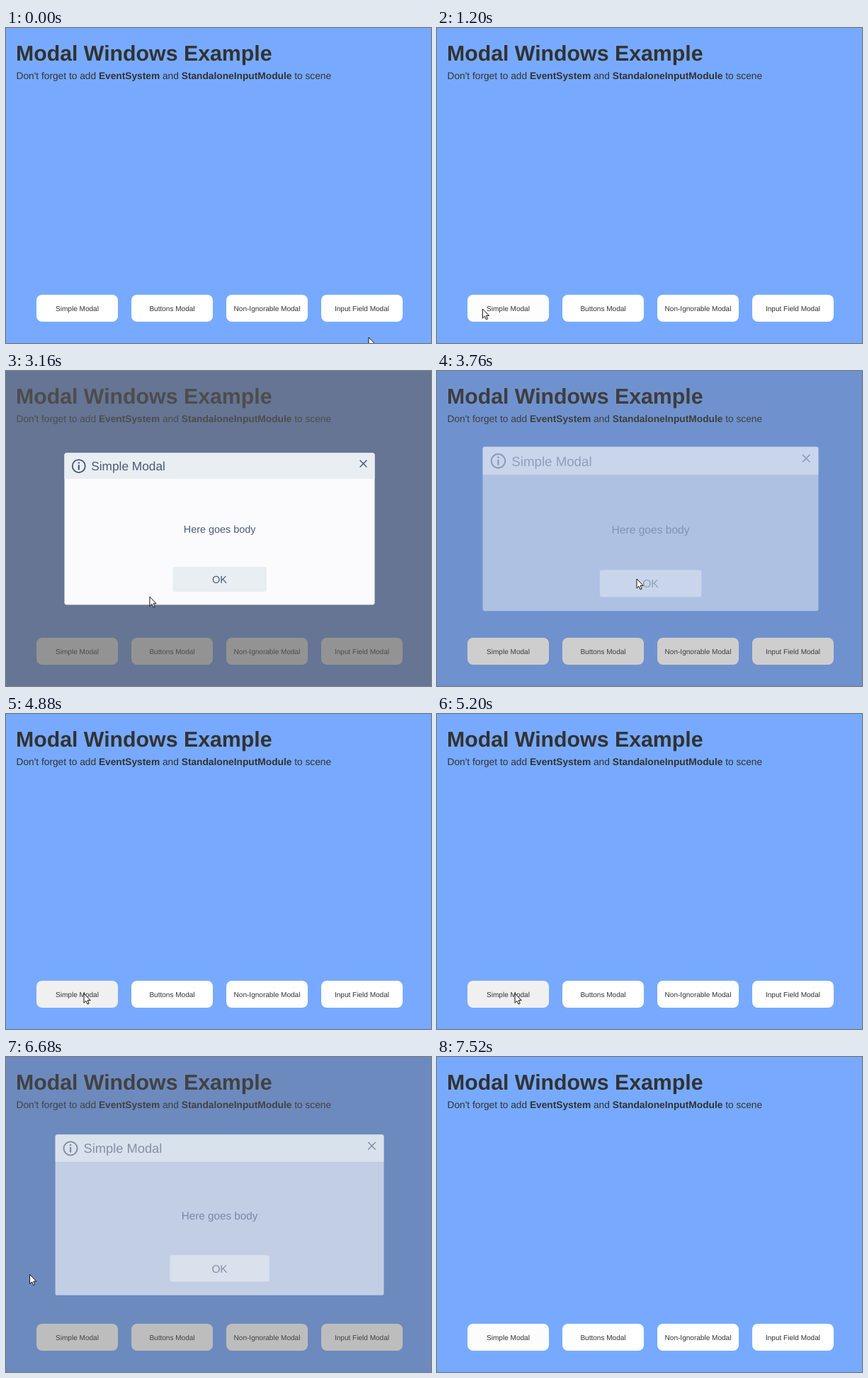
Write an HTML page that moves like this. It is 600 by 444 pixels and loops after 7.76 s.

```html
<!DOCTYPE html>
<html lang="en">
<head>
<meta charset="utf-8">
<title>Modal Windows Example</title>
<style>
  html, body { margin: 0; width: 100%; height: 100%; overflow: hidden; background: #77aaff; }
  svg { display: block; width: 600px; height: 444px; }
  text { font-family: "Liberation Sans", Arial, sans-serif; text-rendering: geometricPrecision; white-space: pre; }
  .page { fill: #323232; }
  .bold { font-weight: bold; }
  .mid { text-anchor: middle; }
  #modal > * { opacity: var(--a); }
  #modal text { fill: #4c5b78; }
  .line { fill: none; stroke: #465470; }
</style>
</head>
<body>
<svg viewBox="0 0 600 444">
  <rect width="600" height="444" fill="#77aaff"/>
  <text class="page bold" x="13.9" y="46.4" font-size="30.3">Modal Windows Example</text>
  <text class="page" x="14.5" y="71.5" font-size="13.74">Don't forget to add <tspan class="bold">EventSystem</tspan> and <tspan class="bold">StandaloneInputModule</tspan> to scene</text>
  <g id="buttons"></g>
  <rect id="dim" width="600" height="444" fill="#5c5a5a"/>
  <g id="modal">
    <rect x="82.5" y="115.5" width="438" height="214" rx="3" fill="#fbfbfd"/>
    <path d="M82.5 152V118.5a3 3 0 0 1 3-3H517.5a3 3 0 0 1 3 3V152Z" fill="#e8eef2"/>
    <circle class="line" cx="102.8" cy="134.1" r="9" stroke-width="1.8"/>
    <path class="line" d="M102.8 128.5v2.1M102.8 132.3v7.2" stroke-width="2.1"/>
    <text x="120.2" y="140.3" font-size="17.3">Simple Modal</text>
    <path class="line" d="M499.6 125.8l9.8 9.8m0-9.8l-9.8 9.8" stroke-width="1.4"/>
    <text class="mid" x="301.6" y="228.2" font-size="14.4">Here goes body</text>
    <rect x="235.3" y="276" width="132.6" height="35.2" rx="3" fill="#e8eef2"/>
    <text class="mid" x="301.5" y="299.1" font-size="14.5">OK</text>
  </g>
  <path id="cursor" d="M0 0V13.2L3 10.4L5.1 15L7.2 14L5.1 9.6H9.2Z" fill="#fff" stroke="#111" stroke-linejoin="round"/>
</svg>
<script>
const LOOP = 7760, STEP = 40;
const CENTER = [301.5, 222.5];
const FADE = 280, GROW = 0.15, DIM = 0.655;

// Cursor moves: [start, end, x, y]; it rests in between
const HOME = [512, 436];
const MOVES = [
  [0, 800, 2, 409], [840, 1400, 90, 390.5], [2520, 3280, 211, 313], [3320, 3560, 282, 293],
  [4240, 4800, 110, 394], [6060, 6440, 33, 306], [6640, LOOP, 191, 471]
];
// [start, end]
const OPEN = [[1630, 3611], [5360, 6560]];
const HOVER = [[1180, 1620], [4620, 5400], [7250, 7450]];

const get = id => document.getElementById(id);
const ramp = (t, start, length) => {
  const k = Math.min(1, Math.max(0, (t - start) / length));
  return k * k * (3 - 2 * k);
};
const within = (spans, t, fade) =>
  Math.max(...spans.map(([a, b]) => ramp(t, a, fade) - ramp(t, b, fade)));

function cursorAt(t) {
  let [x, y] = HOME;
  for (const [a, b, toX, toY] of MOVES) {
    const k = ramp(t, a, b - a);
    x += (toX - x) * k;
    y += (toY - y) * k;
  }
  return [x, y];
}

const labels = ["Simple Modal", "Buttons Modal", "Non-Ignorable Modal", "Input Field Modal"];
get("buttons").innerHTML = labels.map((label, i) => {
  const x = 43 + 134 * i;
  return `<rect x="${x}" y="376" width="115" height="38" rx="8" fill="#fff"/>` +
    `<text class="page mid" x="${x + 57.5}" y="398.6" font-size="10.05">${label}</text>`;
}).join("");
const first = get("buttons").firstChild;

function draw(t) {
  const shown = within(OPEN, t, FADE);
  // Grows in from below full size, keeps growing as it leaves
  const leaving = OPEN.some(([a, b]) => t >= b && t < b + FADE);
  const scale = 1 + (leaving ? GROW : -GROW) * (1 - shown);
  const [cx, cy] = CENTER;
  const modal = get("modal");
  modal.style.setProperty("--a", shown);
  modal.setAttribute("transform", `translate(${cx} ${cy}) scale(${scale}) translate(${-cx} ${-cy})`);
  get("dim").setAttribute("opacity", DIM * shown);

  const grey = Math.round(255 - 15 * within(HOVER, t, 100));
  first.setAttribute("fill", `rgb(${grey},${grey},${grey})`);
  get("cursor").setAttribute("transform", `translate(${cursorAt(t)})`);
}

const begin = performance.now();
function tick() {
  const t = (performance.now() - begin) % LOOP;
  draw(Math.floor(t / STEP) * STEP);
  requestAnimationFrame(tick);
}
tick();
</script>
</body>
</html>
```
